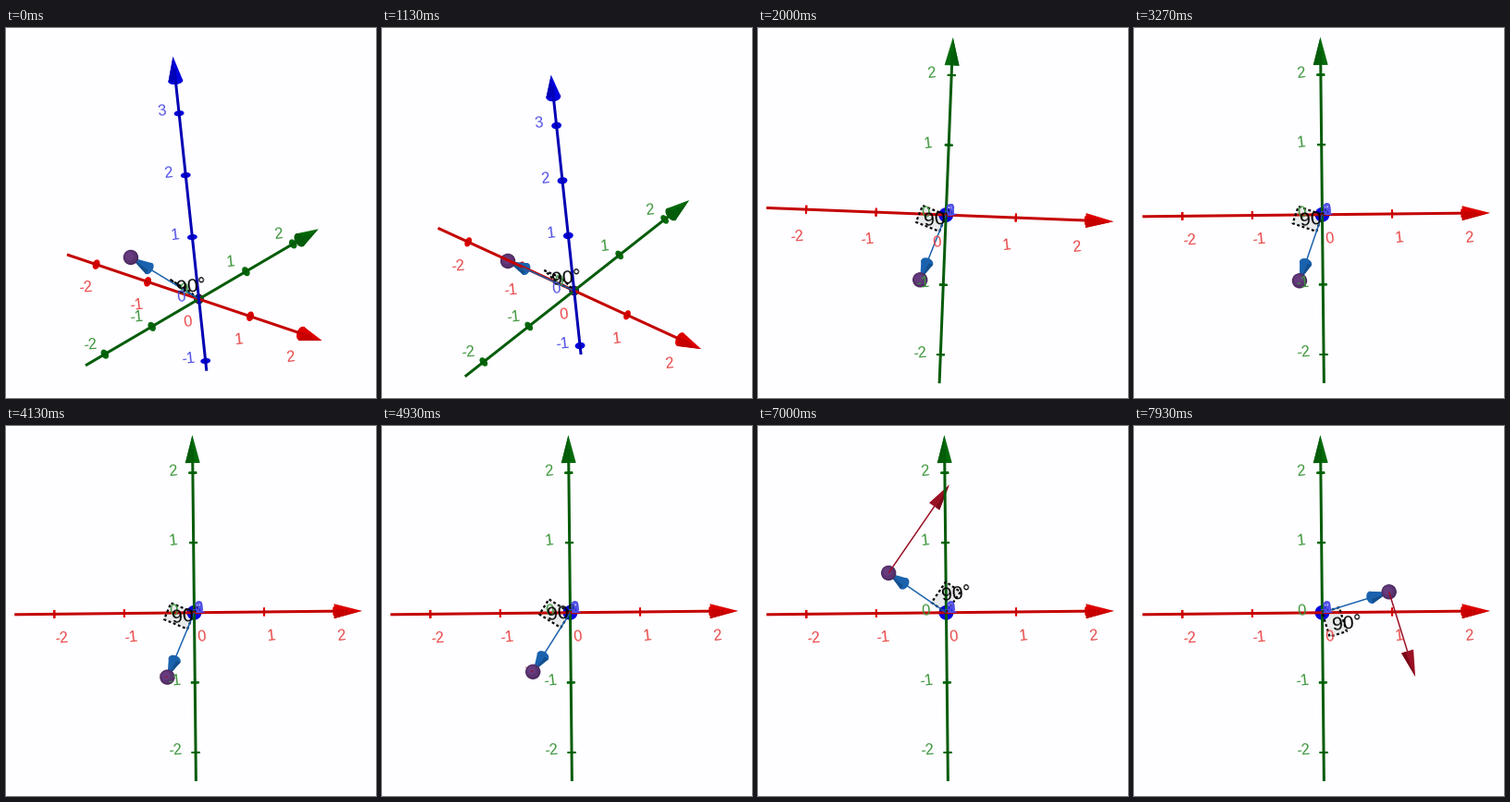
Recreate the animation shown at these times as a matplotlib script. Size 400 by 400 pixels, loop 8000 ms.

```python
import numpy as np
import matplotlib.pyplot as plt
from matplotlib.animation import FuncAnimation
from matplotlib.patches import Circle, Ellipse, Polygon

SIZE, DPI = 400, 100
FRAMES, LOOP = 200, 8000
PX = 72 / DPI                            # points per pixel
UNIT = 75.6                              # pixels per world unit
CENTER = np.array([197.0, 197.3])
PIVOT = np.array([-0.085, 0.06, 1.38])   # middle of the axes box
ROLL = 6.1                               # whole scene and its labels lean left
HEAD, HEAD_R = 0.4, 0.105

RED, GREEN, BLUE = "#dc0000", "#046a0a", "#0404dc"
RED_TXT, GREEN_TXT, BLUE_TXT = "#e84848", "#3c963c", "#5050e6"
EX, EY, EZ = np.eye(3)

# time s, angle deg, speed deg/s of the orbiting point
ORBIT = np.array([
    [3.50, -109.5, 0], [4.93, -122.9, 11], [6.07, -150.5, 47],
    [7.00, -215.1, 129], [7.45, -280.0, 154], [7.93, -344.4, 105],
    [8.20, -370.0, 85]])

fig = plt.figure(figsize=(SIZE / DPI, SIZE / DPI), dpi=DPI, facecolor="#fefdff")
ax = fig.add_axes([0, 0, 1, 1])
ax.set_xlim(0, SIZE)
ax.set_ylim(SIZE, 0)
ax.axis("off")


def ease(t, start, end):
    u = np.clip((t - start) / (end - start), 0, 1)
    return u * u * (3 - 2 * u)


def orbit(t):
    """Angle (deg) and clockwise speed (deg/s) by cubic Hermite pieces."""
    if t <= ORBIT[0, 0]:
        return ORBIT[0, 1], 0.0
    i = np.searchsorted(ORBIT[:, 0], t) - 1
    (t0, a0, w0), (t1, a1, w1) = ORBIT[i], ORBIT[i + 1]
    h = t1 - t0
    u = (t - t0) / h
    m0, m1 = -w0 * h, -w1 * h
    c2, c3 = 3 * (a1 - a0) - 2 * m0 - m1, 2 * (a0 - a1) + m0 + m1
    angle = a0 + m0 * u + c2 * u**2 + c3 * u**3
    return angle, -(m0 + 2 * c2 * u + 3 * c3 * u**2) / h


class View:
    """Parallel projection with yaw, elevation and a fixed roll."""

    def __init__(self, t):
        self.s = ease(t, 0.87, 1.83)
        yaw = 45.3 - 36.95 * self.s ** 2 - 2.85 * ease(t, 2.1, 3.1)
        self.tilt = yaw - ROLL
        a, e, r = np.radians([yaw, 27.1 + 62.9 * self.s, ROLL])
        right = np.array([np.cos(a), np.sin(a), 0])
        up = np.array([-np.sin(a) * np.sin(e), np.cos(a) * np.sin(e), np.cos(e)])
        self.near = np.cross(right, up)
        self.mat = UNIT * np.array([right * np.cos(r) - up * np.sin(r),
                                    -(right * np.sin(r) + up * np.cos(r))])

    def vec(self, v):
        return self.mat @ v

    def point(self, p):
        return CENTER + self.mat @ (np.asarray(p) - PIVOT)


def line(p, q, color, width):
    ax.plot([p[0], q[0]], [p[1], q[1]], color=color, lw=width * PX,
            solid_capstyle="butt")


def poly(points, color):
    ax.add_patch(Polygon(points, fc=color, ec="none"))


def label(p, text, color, size=16.5, ha="center", va="center_baseline"):
    ax.text(p[0], p[1], text, color=color, fontsize=size * PX, ha=ha, va=va,
            family="Liberation Sans", rotation=ROLL, rotation_mode="anchor")


def disc(view, pos, axis, radius, color, edge=0):
    """Flat round plate at right angles to the axis."""
    d = view.vec(axis) / UNIT
    flat = np.sqrt(max(0, 1 - d @ d))
    ax.add_patch(Ellipse(view.point(pos), 2 * radius * UNIT * flat,
                         2 * radius * UNIT,
                         angle=np.degrees(np.arctan2(d[1], d[0])),
                         fc=color, ec=color, lw=edge * PX))


def cone(view, tip, axis, length, radius, color, dark):
    base = tip - axis * length
    a, b = view.point(tip), view.point(base)
    d = view.vec(axis)
    away = view.near @ axis < 0
    if not away:
        disc(view, base, axis, radius, color)
    size = np.hypot(*d)
    if size > 1:
        side = np.array([-d[1], d[0]]) / size * radius * UNIT
        if side[1] < 0:
            side = -side
        poly([a, b + side, b - side], color)
        poly([a, b + side, b + side * 0.3], dark)
    if away:
        disc(view, base, axis, radius, dark)


def draw_axis(view, axis, low, high, ticks, color, dark):
    line(view.point(axis * low), view.point(axis * (high - HEAD / 2)), dark, 3)
    for k in ticks:
        disc(view, axis * k, axis, 0.058, color, 2)
    cone(view, axis * high, axis, HEAD, HEAD_R, color, dark)


def axis_labels(view, axis, ticks, offset, color):
    for k in ticks:
        label(view.point(axis * k) + offset, str(k), color)


def draw_vector(view, start, end, color, dark):
    v = end - start
    size = np.linalg.norm(v)
    if size < 0.01:
        return
    head = min(0.38, size)
    axis = v / size
    line(view.point(start), view.point(end - axis * head * 0.8), color, 1.5)
    cone(view, end, axis, head, 0.09 * head / 0.38, color, dark)


def right_angle(view, u, v):
    """Dotted square between two unit vectors, with its value."""
    side = 0.36
    o, a, b = np.zeros(3), u * side, v * side
    corners = [view.point(p) for p in (o, a, a + b, b)]
    ax.add_patch(Polygon(corners, fc=(0.86, 0.87, 0.87, 0.6), ec="none"))
    xs, ys = zip(*corners, corners[0])
    ax.plot(xs, ys, color="black", lw=2.2 * PX, ls=(0, (1.3, 1.2)),
            dash_capstyle="butt")
    pos = view.point(o) + 1.2 * view.vec((a + b) / 2) + (-4.2, 6.8)
    label(pos, "90°", "black", 21, "left", "baseline")


def ball(p):
    for radius, shift, color in ((8.2, 0, "#4b2a5f"), (7, 0.5, "#5a3370"),
                                 (4.6, 1.3, "#663c7e")):
        ax.add_patch(Circle(p - shift, radius, fc=color, ec="none"))


def blend(p, q, k):
    return np.array(p) * (1 - k) + np.array(q) * k


def draw(frame):
    for artist in [*ax.lines, *ax.patches, *ax.texts]:
        artist.remove()
    t = frame * LOOP / FRAMES / 1000
    view = View(t)
    s = view.s
    angle, speed = orbit(t)
    c, n = np.cos(np.radians(angle)), np.sin(np.radians(angle))
    pos = np.array([c, n, 1.0])
    heading = np.array([n, -c, 0.0])

    flat = range(-2, 3)
    tall = range(-1, 4)
    x_off = blend((-12, 24), (-10, 28), s) if view.tilt > 0 else np.array([7.5, 25])
    y_off = blend((-16.3, -11.5), (-22.3, -3.3), s ** 2)
    z_off = blend((-19, -3.5), (4.5, -6), s ** 4)

    draw_axis(view, EY, -2.41, 2.54, flat, GREEN, "#045c0a")
    draw_axis(view, EX, -2.57, 2.4, flat, RED, "#c40000")
    axis_labels(view, EX, flat, x_off, RED_TXT)
    axis_labels(view, EY, flat, y_off, GREEN_TXT)

    right_angle(view, pos / np.sqrt(2), heading)
    draw_vector(view, np.zeros(3), pos, "#1a62ae", "#14508f")
    axis_labels(view, EZ, tall, z_off, BLUE_TXT)
    draw_axis(view, EZ, -1.16, 3.92, tall, BLUE, "#0000b4")
    if s < 0.95:
        ax.add_patch(Circle(view.point(np.zeros(3)), 4.6, fc="#2c3a66",
                            ec="#1c2440", lw=PX))
    draw_vector(view, pos, pos + heading * speed / 84, "#9a1024", "#7a0a1a")
    ball(view.point(pos))
    return []


anim = FuncAnimation(fig, draw, frames=FRAMES, init_func=lambda: [],
                     interval=LOOP // FRAMES, repeat=True, repeat_delay=0,
                     blit=False)
plt.show()
```
